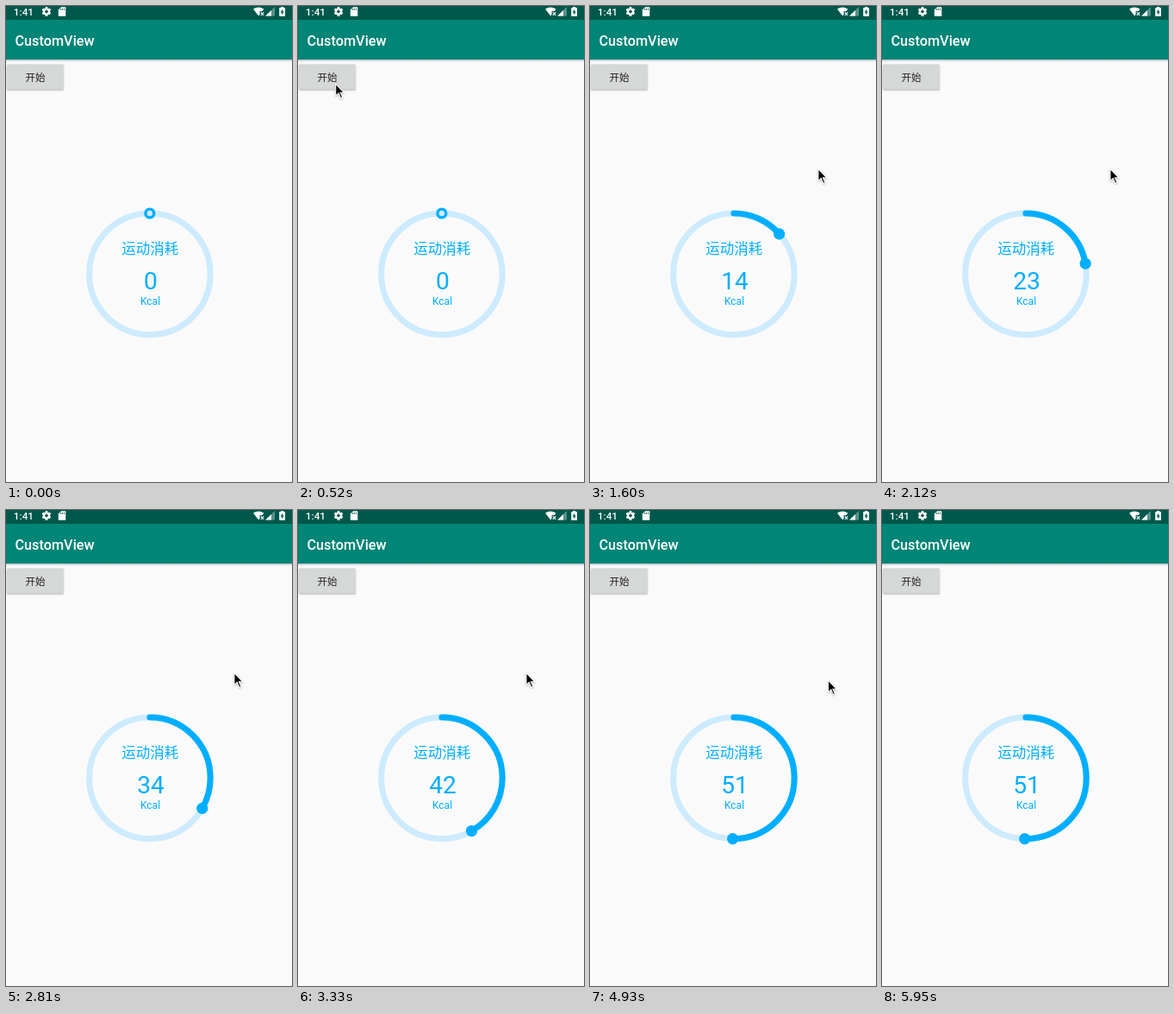
An HTML page with a canvas for the animation above (6430 ms loop, 332 by 551 pixels).

```html
<!DOCTYPE html>
<html lang="zh">
<head>
<meta charset="utf-8">
<title>CustomView</title>
<style>
html, body { margin: 0; width: 100%; height: 100%; overflow: hidden; background: #fafafa; }
canvas { display: block; width: 332px; height: 551px; }
</style>
</head>
<body>
<canvas id="stage"></canvas>
<script>
const W = 332, H = 551, LOOP = 6430;
const BLUE = '#00aeff', TRACK = '#cdebfd', DARK = '#00574b';
const RING = { x: 166.9, y: 310.3, r: 70.3, width: 7 };
const LATIN = 'Roboto, sans-serif';
const HAN = '"Noto Sans CJK SC", "Noto Sans CJK", sans-serif';

const canvas = document.getElementById('stage');
const ctx = canvas.getContext('2d');
const dpr = window.devicePixelRatio || 1;
canvas.width = W * dpr;
canvas.height = H * dpr;

// The screen refreshes twelve times between neighbouring marks.
const MARKS = [50, 750, 1430, 2120, 2810, 3510, 4190];
const TICKS = [0];
for (let i = 0; i < MARKS.length - 1; i++) {
  const step = (MARKS[i + 1] - MARKS[i]) / 12;
  for (let n = 0; n < 12; n++) TICKS.push(Math.round((MARKS[i] + n * step - 0.1) / 10) * 10);
}
TICKS.push(4930, 4990, 5050, 5890, 5950);

const SWEEP = [[781, 0], [980, 11.8], [1600, 48.7], [2120, 80], [2810, 120], [3850, 181]];
const PRESS = [[740, 0], [860, 1], [1100, 1], [1300, 0]];

function snap(t) {
  let last = 0;
  for (const tick of TICKS) if (tick <= t) last = tick;
  return last;
}

function along(keys, t) {
  if (t <= keys[0][0]) return keys[0][1];
  for (let i = 1; i < keys.length; i++) {
    const [t0, a] = keys[i - 1], [t1, b] = keys[i];
    if (t <= t1) return a + (b - a) * (t - t0) / (t1 - t0);
  }
  return keys[keys.length - 1][1];
}

const mix = (a, b, u) => a + (b - a) * u;
const smooth = u => u * u * (3 - 2 * u);
const part = (t, a, b) => Math.min(1, Math.max(0, (t - a) / (b - a)));

function pointerAt(t) {
  if (t < 50) return null;
  if (t < 750) {
    const u = smooth(part(t, 0, 570));
    return [mix(325, 37, u), mix(273, 85, u)];
  }
  if (t < 4930) {
    const u = smooth(part(t, 853, 1370));
    return [mix(37, 264.5, u), mix(85, 187.5, u ** 1.6)];
  }
  if (t < 4990) return [276, 196];
  if (t < 5050) return [302, 217];
  if (t >= 5890 && t < 5950) return [313, 537];
  return null;
}

function rect(x, y, w, h, color) {
  ctx.fillStyle = color;
  ctx.fillRect(x, y, w, h);
}

function shape(points, color) {
  ctx.beginPath();
  points.forEach(([x, y]) => ctx.lineTo(x, y));
  ctx.closePath();
  ctx.fillStyle = color;
  ctx.fill();
}

function text(str, x, y, font, color, align = 'center') {
  ctx.font = font;
  ctx.fillStyle = color;
  ctx.textAlign = align;
  ctx.fillText(str, x, y);
}

function arc(x, y, r, from, to, width, color) {
  ctx.beginPath();
  ctx.arc(x, y, r, from, to);
  ctx.lineWidth = width;
  ctx.strokeStyle = color;
  ctx.stroke();
}

function gear(x, y) {
  ctx.save();
  ctx.translate(x, y);
  for (let i = 0; i < 6; i++) {
    rect(-1.4, -5.3, 2.8, 3, '#fff');
    ctx.rotate(Math.PI / 3);
  }
  arc(0, 0, 2.9, 0, 2 * Math.PI, 2.2, '#fff');
  ctx.restore();
}

function statusBar() {
  rect(0, 0, W, 16, DARK);
  text('1:41', 8.8, 10.8, '500 11.8px ' + LATIN, '#fff', 'left');
  gear(47, 6.4);

  shape([[64, 1.2], [69.3, 1.2], [69.3, 11.7], [60.8, 11.7], [60.8, 4.4]], '#fff');
  for (const x of [63.2, 65.1, 67]) rect(x, 2.8, 0.9, 2, DARK);

  ctx.beginPath();
  ctx.moveTo(293.2, 11.6);
  ctx.lineTo(287, 3.6);
  ctx.quadraticCurveTo(293.2, -0.6, 299.4, 3.6);
  ctx.lineTo(297.6, 6);
  ctx.lineTo(294.6, 6);
  ctx.lineTo(294.6, 9.8);
  ctx.closePath();
  ctx.fillStyle = '#fff';
  ctx.fill();
  ctx.beginPath();
  ctx.moveTo(295.8, 7.2); ctx.lineTo(299.2, 10.8);
  ctx.moveTo(299.2, 7.2); ctx.lineTo(295.8, 10.8);
  ctx.lineWidth = 1.1;
  ctx.strokeStyle = '#fff';
  ctx.stroke();

  shape([[312, 1], [312, 11.6], [301.2, 11.6]], 'rgba(255,255,255,.35)');
  shape([[308, 4.9], [308, 11.6], [301.2, 11.6]], '#fff');

  rect(319, 1, 3.2, 1.5, '#fff');
  rect(317.2, 2, 6.8, 9.8, '#fff');
  shape([[321.2, 3.4], [318.5, 7.6], [320.2, 7.6], [320.2, 10.6], [322.8, 6.4], [321.2, 6.4]], DARK);
}

function appBar() {
  rect(0, 16, W, 46, '#008577');
  const shade = ctx.createLinearGradient(0, 62, 0, 65);
  shade.addColorStop(0, 'rgba(0,0,0,.22)');
  shade.addColorStop(1, 'rgba(0,0,0,0)');
  rect(0, 62, W, 3, shade);
  text('CustomView', 10.4, 46, '500 16.3px ' + LATIN, '#fff', 'left');
}

function button(press) {
  const g = Math.round(mix(214, 202, press));
  ctx.save();
  ctx.shadowColor = 'rgba(0,0,0,.3)';
  ctx.shadowBlur = 1.6 * dpr;
  ctx.shadowOffsetY = 0.8 * dpr;
  ctx.beginPath();
  ctx.roundRect(0.8, 67.4, 66.2, 29.2, 1.5);
  ctx.fillStyle = `rgb(${g},${g + 1},${g + 1})`;
  ctx.fill();
  ctx.restore();
  text('开始', 34, 86.6, '400 11.5px ' + HAN, '#222');
}

function gauge(deg) {
  const { x, y, r, width } = RING;
  const top = -Math.PI / 2, end = top + deg * Math.PI / 180;
  arc(x, y, r, 0, 2 * Math.PI, width, TRACK);
  ctx.lineCap = 'round';
  if (deg > 0) arc(x, y, r, top, end, width, BLUE);
  ctx.lineCap = 'butt';
  arc(x + r * Math.cos(end), y + r * Math.sin(end), 4.9, 0, 2 * Math.PI, 3.4, BLUE);

  text('运动消耗', 167.2, 286.8, '400 16.5px ' + HAN, BLUE);
  text(String(Math.ceil(deg / 3.6)), 168, 328, '400 28.2px ' + LATIN, BLUE);
  text('Kcal', 167.5, 345.6, '400 12px ' + LATIN, BLUE);
}

function pointer([x, y]) {
  ctx.save();
  ctx.translate(x, y);
  ctx.shadowColor = 'rgba(0,0,0,.3)';
  ctx.shadowBlur = 2 * dpr;
  ctx.shadowOffsetY = dpr;
  shape([[0, 0], [0, 16], [3.6, 12.8], [6.1, 18.4], [9, 17.1], [6.6, 11.7], [11.3, 11.7]], '#fff');
  ctx.shadowColor = 'transparent';
  shape([[1, 2.4], [1, 13.7], [4, 11], [6.6, 17], [7.7, 16.5], [5.1, 10.7], [9, 10.7]], '#000');
  ctx.restore();
}

function draw(ms) {
  const t = snap(ms);
  ctx.setTransform(dpr, 0, 0, dpr, 0, 0);
  rect(0, 0, W, H, '#fafafa');
  statusBar();
  appBar();
  button(along(PRESS, t));
  gauge(along(SWEEP, t));
  const tip = pointerAt(t);
  if (tip) pointer(tip);
}

const start = performance.now();
function loop() {
  draw((performance.now() - start) % LOOP);
  requestAnimationFrame(loop);
}
loop();
</script>
</body>
</html>
```
